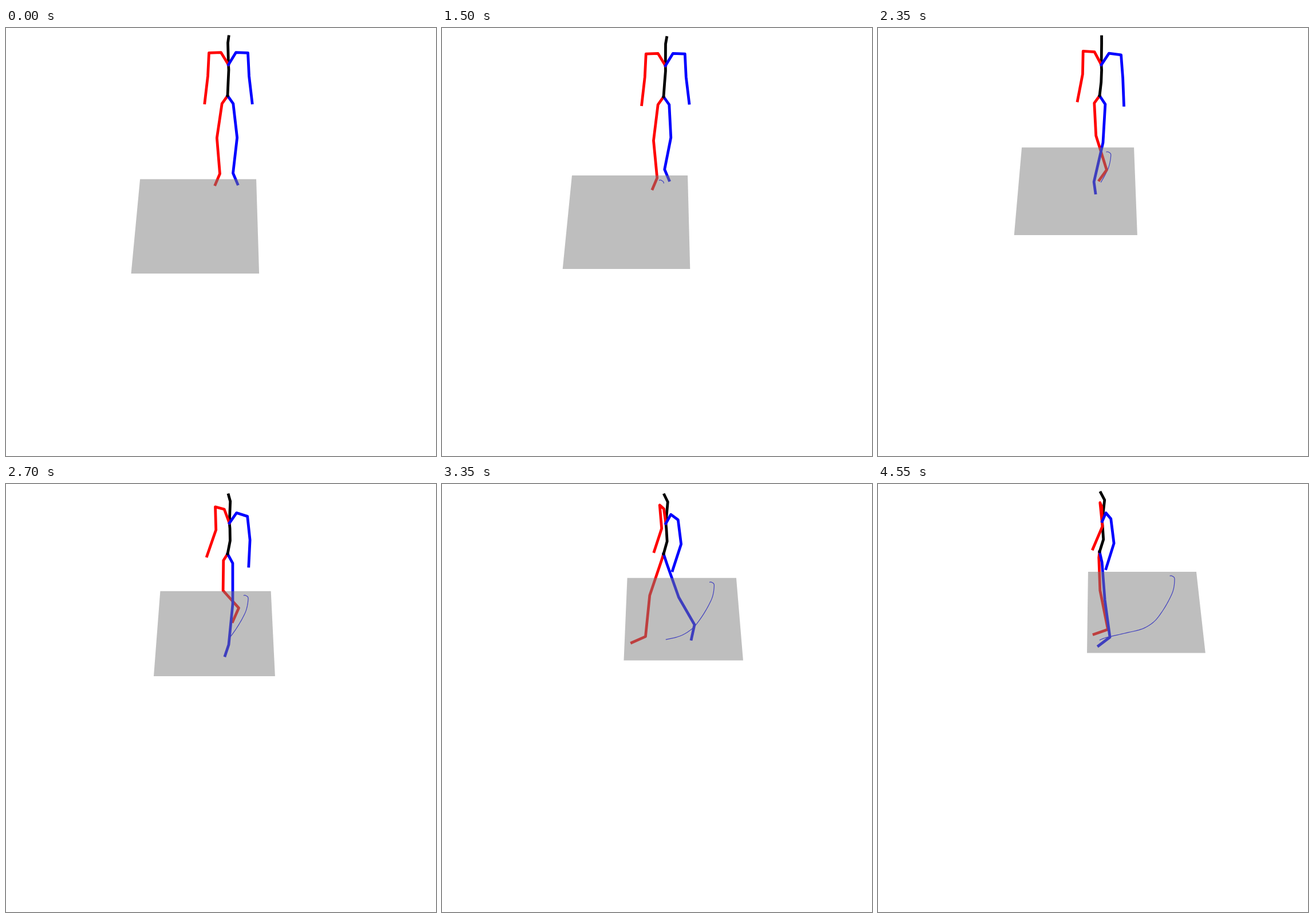
Animation, 751 px wide and 746 px high, one loop 4.6 s. Source, as an HTML page with a canvas:

```html
<!DOCTYPE html>
<html lang="en">
<head>
<meta charset="utf-8">
<title>Walking figure</title>
<style>
  html, body { margin: 0; width: 100%; height: 100%; overflow: hidden; background: #fff; }
  canvas { display: block; }
</style>
</head>
<body>
<canvas id="stage" width="751" height="746"></canvas>
<script>
const ctx = document.getElementById('stage').getContext('2d');
const LOOP = 4600, FRAME = 50;
const RED = '#f00', BLUE = '#00f', BLACK = '#000';

const clamp = u => Math.max(0, Math.min(1, u));
const smooth = (from, to, t) => {
  const u = clamp((t - from) / (to - from));
  return u * u * (3 - 2 * u);
};

// --- Ground: x is sideways, z shrinks towards the viewer ---
const EYE_X = 387.5, HORIZON = -1350;
const FLOOR_W = 0.12575, FLOOR_D = 5.73e-5;
const project = (x, z) => [EYE_X + x / z, 1 / z + HORIZON];
const unproject = (x, y) => {
  const z = 1 / (y - HORIZON);
  return { x: (x - EYE_X) * z, z };
};

// Path of the floor's near left corner: time, x, y
const path = [
  [0, 218.5, 428], [1100, 214, 427.3], [1500, 210.7, 420], [2000, 221.5, 387], [2700, 258, 335],
  [3000, 284, 316.5], [3350, 317.5, 307.5], [3850, 351.5, 299.5], [4550, 365, 294.5]
];

// Smooth curve through the path, at rest at both ends
function floorAt(t) {
  const i = Math.max(0, path.findIndex(p => p[0] >= t) - 1);
  const a = path[i], b = path[i + 1], span = b[0] - a[0];
  const u = (t - a[0]) / span, v = 1 - u;
  const slope = (k, c) => {
    const p = path[k - 1], n = path[k + 1];
    return p && n ? (n[c] - p[c]) / (n[0] - p[0]) * span : 0;
  };
  const value = c => v * v * (1 + 2 * u) * a[c] + u * u * (3 - 2 * u) * b[c]
    + u * v * (v * slope(i, c) - u * slope(i + 1, c));
  return unproject(value(1), value(2));
}

// Where a spot seen at (x, y) at time `from` has been carried by time t
function carry(x, y, from, t) {
  const spot = unproject(x, y), then = floorAt(from), now = floorAt(t);
  return project(spot.x + now.x - then.x, spot.z + now.z - then.z);
}

// --- Walk: each step lands on a spot that then stays fixed to the floor ---
const STEP = 575, STRIDE = 1350, LIFT = 27;
const redSteps = [
  { at: 0, x: 373.5, y: 254 },
  { start: 1120, at: 2000, x: 386.5, y: 270 },
  { start: 2600, at: 4550, x: 401.5, y: 253.5 }
];
const blueSteps = [
  { at: 0, x: 396.5, y: 253 },
  { start: 1920, at: 2700, x: 389, y: 280 },
  { start: 3280, at: 4550, x: 405, y: 267 }
];

function footAt(steps, t) {
  const spot = s => carry(s.x, s.y, s.at, t);
  let ankle = spot(steps[0]), push = 0;
  for (const step of steps.slice(1)) {
    if (t < step.start) break;
    const u = clamp((t - step.start) / STEP), w = smooth(0, 1, u), [x, y] = spot(step);
    ankle = [
      ankle[0] + (x - ankle[0]) * w,
      ankle[1] + (y - ankle[1]) * w - LIFT * Math.sin(Math.PI * u)
    ];
    push = Math.max(0, Math.sin(2 * Math.PI * u));
  }
  return { ankle, push };
}

// --- Body: joints are offsets (side, down, forward), turned with the body ---
const TILT = 0.43;

function figureAt(t) {
  const yaw = 1.3 * (1 - Math.exp(-((Math.max(0, t - 2060) / 880) ** 1.5)));
  const sin = Math.sin(yaw), cos = Math.cos(yaw);
  const from = ([x, y], side, down, forward) => [
    x + side * cos - forward * sin,
    y + down + TILT * (side * sin + forward * cos)
  ];

  const walk = smooth(1000, 1500, t) * (1 - smooth(3350, 3900, t));
  const bob = 1.9 * walk * (1 + Math.cos(4 * Math.PI * (t - 2000) / STRIDE));
  const swing = 4 * walk * Math.cos(2 * Math.PI * (t - 2000) / STRIDE);
  const lean = t > 1250 ? 3 * Math.sin(2 * Math.PI * (t - 1250) / 1000) : 0;

  const pelvis = [387, 118 + bob];
  const back = (side, down, forward) => {
    const [x, y] = from(pelvis, side, down, forward);
    return [x - lean * down / 90, y];
  };
  const chest = back(1.5, -53, -2.5);
  const spine = [
    pelvis, back(1, -21, -6), back(2, -43.5, -3.5), chest, back(0.5, -89.5, -6), back(2, -104, 2)
  ];

  const arm = side => {
    const shoulder = from(chest, 34 * side, -18, -6);
    const elbow = from(shoulder, 2 * side, 42.5, -5);
    const wrist = from(elbow, 5.5 * side, 40, 16 + swing * side);
    return [chest, from(chest, 13 * side, -20, -3), shoulder, elbow, wrist];
  };

  const leg = (side, steps) => {
    const hip = from(pelvis, 9.8 * side, 14.5, -1.5);
    const { ankle, push } = footAt(steps, t);
    const bend = 0.3 * Math.max(0, 118 - (ankle[1] - hip[1]));
    const middle = [(hip[0] + ankle[0]) / 2, (hip[1] + ankle[1]) / 2];
    const knee = from(middle, 7 * side, bend - 3, bend + 4);
    const toe = from(ankle, 8 * side, 9 + 16 * push, 23 - 18 * push);
    return [pelvis, hip, knee, ankle, toe];
  };

  return [
    [leg(-1, redSteps), RED], [leg(1, blueSteps), BLUE], [spine, BLACK],
    [arm(-1), RED], [arm(1), BLUE]
  ];
}

// --- Drawing ---
function trace(points) {
  ctx.beginPath();
  points.forEach(p => ctx.lineTo(...p));
}

function line(points, color, width) {
  trace(points);
  ctx.strokeStyle = color;
  ctx.lineWidth = width;
  ctx.stroke();
}

function draw(t) {
  ctx.clearRect(0, 0, 751, 746);
  ctx.lineCap = 'square';
  ctx.lineJoin = 'round';

  const trail = [];
  for (let s = 0; s < t; s += FRAME) trail.push(carry(387.3, 272, s, t));
  line(trail, BLUE, 1.2);
  for (const [points, color] of figureAt(t)) line(points, color, 4.8);

  const { x, z } = floorAt(t), farZ = z + FLOOR_D, right = x + FLOOR_W;
  trace([project(x, z), project(x, farZ), project(right, farZ), project(right, z)]);
  ctx.fillStyle = 'rgba(127, 127, 127, 0.5)';
  ctx.fill();
}

const start = performance.now();
function tick() {
  const t = Math.max(0, performance.now() - start) % LOOP;
  draw(Math.floor(t / FRAME) * FRAME);
  requestAnimationFrame(tick);
}
tick();
</script>
</body>
</html>
```
